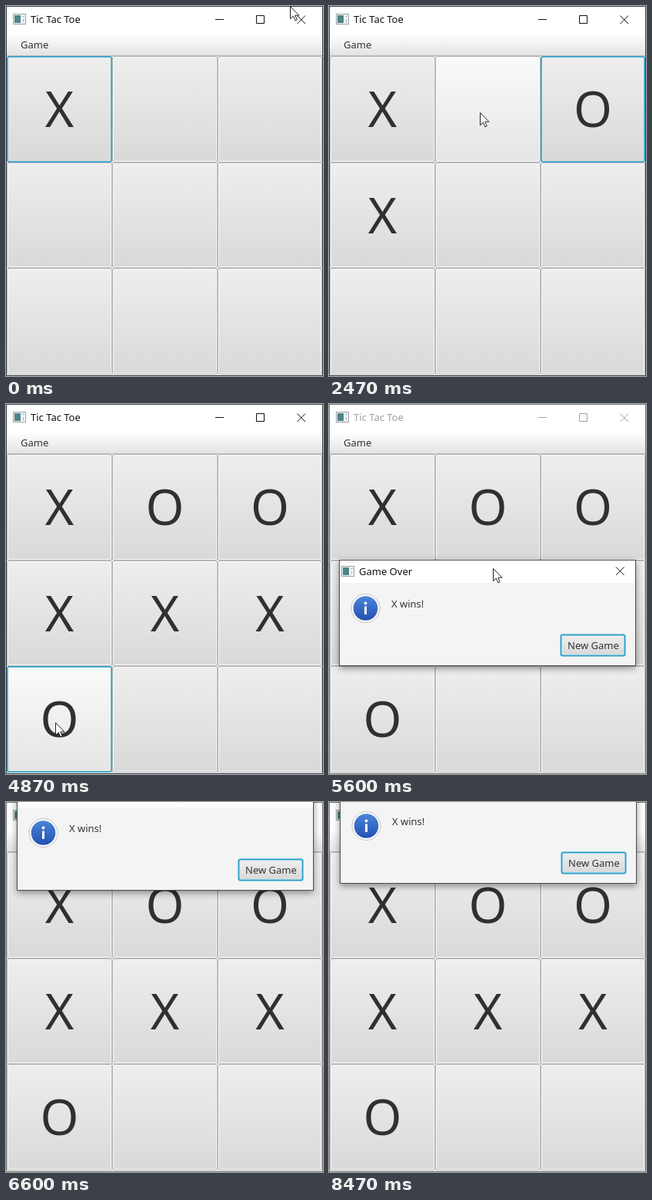
An HTML page for the animation above (8740 ms loop, 412 px wide and 480 px high).

```html
<!DOCTYPE html>
<html lang="en">
<head>
<meta charset="utf-8">
<title>Tic Tac Toe</title>
<style>
html, body { margin: 0; width: 100%; height: 100%; overflow: hidden; background: #f4f4f4; }
svg { display: block; width: 412px; height: 480px; }
text { font: 13px "Noto Sans", "Open Sans", sans-serif; fill: #333; }
.title { fill: #111; }
.mark { font-size: 64px; text-anchor: middle; fill: #303030; }
.line { fill: none; stroke: #111; }
.inactive .title { fill: #a0a0a0; }
.inactive .line { stroke: #a0a0a0; }
.frame { fill: none; stroke: #3a4348; }
.inactive .frame { stroke: #777; }
.edge { fill: #b6b6b6; }
.shine { fill: #f9f9f9; }
.body { fill: url(#normal); }
.hover .body { fill: url(#hover); }
.pressed .body { fill: url(#pressed); }
.focus .edge { fill: #2b9fc8; }
.focus .shine { fill: #6fbad4; }
</style>
</head>
<body>
<svg viewBox="0 0 412 480">
  <defs>
    <linearGradient id="normal" x2="0" y2="1"><stop stop-color="#eee"/><stop offset="1" stop-color="#d9d9d9"/></linearGradient>
    <linearGradient id="hover" x2="0" y2="1"><stop stop-color="#fafafa"/><stop offset="1" stop-color="#e5e5e5"/></linearGradient>
    <linearGradient id="pressed" x2="0" y2="1"><stop stop-color="#e0e0e0"/><stop offset="1" stop-color="#cdcdcd"/></linearGradient>
    <linearGradient id="menu" x2="0" y2="1"><stop stop-color="#fff"/><stop offset="1" stop-color="#e3e3e3"/></linearGradient>
    <linearGradient id="blue" x2="0" y2="1"><stop stop-color="#4a86d8"/><stop offset="1" stop-color="#2450b4"/></linearGradient>
    <filter id="shadow" x="-10%" y="-20%" width="120%" height="150%">
      <feDropShadow dx="0" dy="3" stdDeviation="5" flood-color="#000" flood-opacity=".42"/>
    </filter>
    <g id="icon">
      <rect x=".5" y=".5" width="16" height="13" fill="#f3f5f6" stroke="#9aa0a4"/>
      <rect x="2" y="2" width="8" height="10" fill="#4d8588"/>
      <path d="M12 3.5h3M13.5 7v4" stroke="#a9b4b8"/>
    </g>
  </defs>

  <g id="win">
    <rect width="412" height="480" fill="#f4f4f4"/>
    <rect width="412" height="36" fill="#fff"/>
    <use href="#icon" x="9" y="10"/>
    <text class="title" x="32" y="22">Tic Tac Toe</text>
    <path class="line" d="M272 17.5h11M325.5 12.5h10v10h-10zM378.5 12.5l10.5 10.5M389 12.5l-10.5 10.5"/>
    <rect y="36" width="412" height="28" fill="url(#menu)"/>
    <path d="M0 64.5h412" stroke="#b8b8b8"/>
    <text x="19" y="55">Game</text>
    <g id="board"></g>
    <rect class="frame" x=".5" y=".5" width="411" height="479"/>
  </g>

  <g id="dialog">
    <g filter="url(#shadow)"><rect width="386" height="138" fill="#f4f4f4"/></g>
    <rect width="386" height="30" fill="#fff"/>
    <rect x=".5" y=".5" width="385" height="137" fill="none" stroke="#4c4c4c"/>
    <use href="#icon" x="3" y="8"/>
    <text class="title" x="26" y="20">Game Over</text>
    <path class="line" d="M360 9.5l10.5 10.5M370.5 9.5l-10.5 10.5"/>
    <circle cx="34.5" cy="63" r="18.5" fill="#fdfdfd" stroke="#c2c2c2"/>
    <circle cx="34.5" cy="63" r="15.8" fill="url(#blue)"/>
    <circle cx="34.5" cy="56.5" r="1.9" fill="#fff"/>
    <rect x="33" y="60.5" width="3" height="10.5" rx=".6" fill="#fff"/>
    <text x="68" y="62">X wins!</text>
    <rect x="287.5" y="96.5" width="85" height="29" rx="3" fill="#2b9fc8"/>
    <rect x="289" y="98" width="82" height="26" rx="2" fill="#8fd0e6"/>
    <rect x="290" y="99" width="80" height="24" rx="1" fill="url(#normal)"/>
    <text x="297" y="116">New Game</text>
  </g>

  <path id="cursor" d="M.5.5v16.2l3.8-3.6 2.5 5.7 2.4-1-2.5-5.6h5.2z" fill="#fff" stroke="#222"/>
</svg>
<script>
const LOOP = 8740, STEP = 200 / 3;
const DIALOG_AT = 4930, DRAG_AT = 5870;
const START = { x: 13, y: 202 }, GRIP = { x: 206, y: 4 };

// time, x, y of the pointer tip
const path = [
  [0, 369, 0], [130, 364, 30], [330, 364, 30], [600, 355, 90], [800, 346, 125], [930, 344, 132],
  [1200, 344, 132], [2070, 335, 165], [2330, 335, 165], [2460, 196, 138], [2930, 196, 138],
  [3530, 62, 310], [3800, 46, 380], [4200, 58, 404], [4470, 64, 413], [4930, 64, 413],
  [5400, 205, 225], [5730, 219, 206], [5870, 219, 206], [6070, 219, 102], [6266, 219, 25],
  [6470, 220, -10], [6730, 220, -28]
];
// press time, release time, clicked cell, reply cell
const moves = [[860, 1195, 2, 3], [2795, 2925, 1, 4], [4660, 4795, 6, 5]];

const $ = id => document.getElementById(id);
const el = (tag, attrs, parent) => {
  const node = document.createElementNS("http://www.w3.org/2000/svg", tag);
  for (const k in attrs) node.setAttribute(k, attrs[k]);
  return parent.appendChild(node);
};

const cols = [1, 138, 275, 411], rows = [65, 203, 340, 478];
const cells = Array.from({ length: 9 }, (_, i) => {
  const c = i % 3, r = Math.floor(i / 3);
  const x = cols[c], y = rows[r], w = cols[c + 1] - x, h = rows[r + 1] - y;
  const group = el("g", {}, $("board"));
  ["edge", "shine", "body"].forEach((name, d) =>
    el("rect", { class: name, x: x + d, y: y + d, width: w - 2 * d, height: h - 2 * d, rx: 3 - d }, group));
  const label = el("text", { class: "mark", x: x + w / 2, y: [157, 295, 432][r] }, group);
  return { group, label };
});

function pointer(t) {
  const i = path.findIndex(p => p[0] > t);
  if (i < 0) return { x: 220, y: -28 };
  const [t0, x0, y0] = path[i - 1], [t1, x1, y1] = path[i];
  const k = (t - t0) / (t1 - t0);
  return { x: Math.round(x0 + (x1 - x0) * k), y: Math.round(y0 + (y1 - y0) * k) };
}

const cellAt = p => p.y < 65 ? -1 : 3 * (p.y < 203 ? 0 : p.y < 340 ? 1 : 2) + (p.x < 138 ? 0 : p.x < 275 ? 1 : 2);
const place = (id, p) => $(id).setAttribute("transform", `translate(${p.x} ${p.y})`);

function draw(t) {
  const p = pointer(t), open = t >= DIALOG_AT;
  const marks = ["X"];
  let focus = 0, pressed = -1;
  for (const [down, up, cell, reply] of moves) {
    if (t >= down) focus = cell;
    if (t >= down && t < up) pressed = cell;
    if (t >= up) { marks[cell] = "O"; marks[reply] = "X"; }
  }
  const hover = open ? -1 : cellAt(p);
  cells.forEach(({ group, label }, i) => {
    const state = [i === hover && "hover", i === pressed && "pressed", !open && i === focus && "focus"];
    group.setAttribute("class", state.filter(Boolean).join(" "));
    label.textContent = marks[i] || "";
  });
  $("win").setAttribute("class", open ? "inactive" : "");
  $("dialog").style.display = open ? "" : "none";
  place("dialog", t < DRAG_AT ? START : { x: p.x - GRIP.x, y: p.y - GRIP.y });
  place("cursor", p);
}

const begin = performance.now();
function tick() {
  const t = (performance.now() - begin) % LOOP;
  draw(Math.floor((t + 4) / STEP) * STEP);
  requestAnimationFrame(tick);
}
tick();
</script>
</body>
</html>
```
